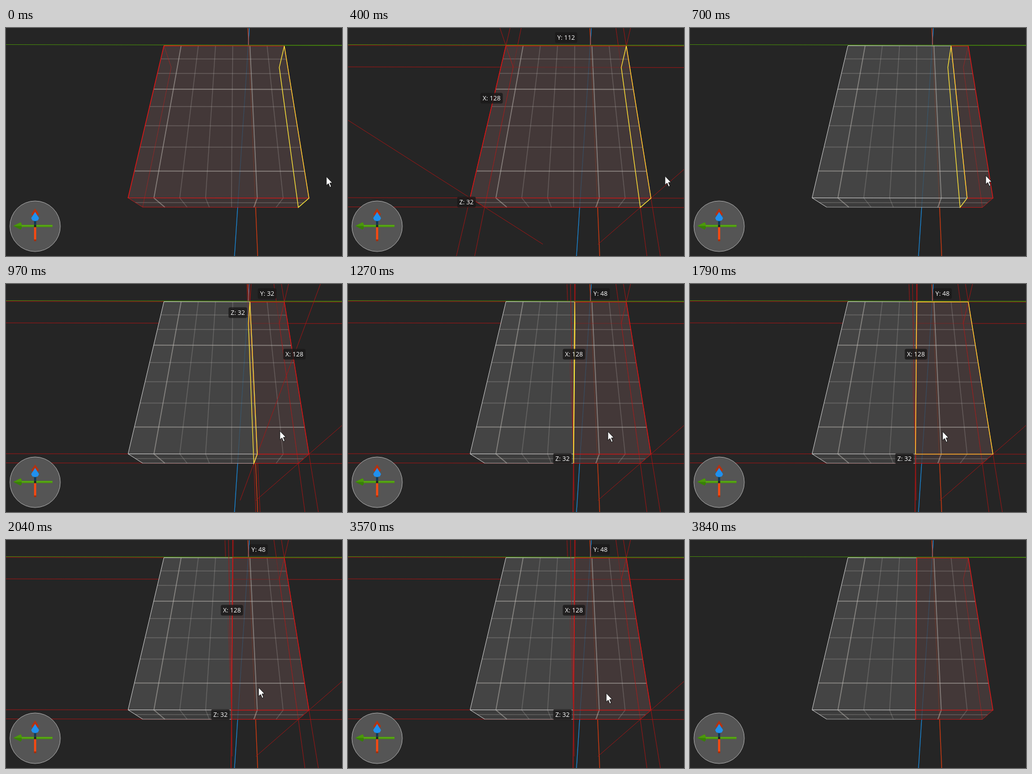
Recreate the animation shown at these times as an HTML page with a canvas. Size 600x406 px, loop 3.99 s.

```html
<!DOCTYPE html>
<html lang="en">
<head>
<meta charset="utf-8">
<style>
  html, body { margin: 0; overflow: hidden; background: #252525; }
  canvas { display: block; }
</style>
</head>
<body>
<canvas width="600" height="406"></canvas>
<script>
const ctx = document.querySelector('canvas').getContext('2d');
const LOOP = 3990, COLS = 7, ROWS = 8;
const RED = '#f01414', GUIDE = 'rgba(170,20,20,.85)', YELLOW = '#f8ee3c', GREEN = '#44800e';

// Corners per face: far left, far right, near left, near right
const TOP = [[282, 31], [497, 31.5], [218, 302], [541, 302.5]];
const BOTTOM = [[295, 69.3], [488, 69.7], [244, 318.5], [522, 319]];

// start, cut column, guide opacity, highlighted face, cursor x, y
const STATES = [
  [0, 0, 0, 'side', 572, 264],
  [400, 0, 1, 'side', 566, 263],
  [550, 0, 1, 'side', 548, 262],
  [700, 6, 0, 'side', 528, 262],
  [820, 6, 1, 'side', 508, 261],
  [970, 5, 1, 'side', 489, 261],
  [1120, 5, 1, 'side', 473, 261],
  [1270, 4, 1, 'side', 464, 262],
  [1390, 4, 1, 'side', 457, 262],
  [1510, 4, 1, 'side', 451, 262],
  [1790, 4, 1, 'top', 451, 262],
  [2040, 4, 1, '', 451, 262],
  [3570, 4, 1, '', 461, 272],
  [3720, 4, .5, '', 505, 318],
  [3840, 4, 0, '', -50, 0]
];

const mix = (a, b, t) => [a[0] + (b[0] - a[0]) * t, a[1] + (b[1] - a[1]) * t];

function point(face, col, depth) {
  const s = depth * 215 / (323 * (1 - depth) + 215 * depth);
  const u = col / COLS;
  return mix(mix(face[0], face[1], u), mix(face[2], face[3], u), s);
}

function path(points, closed) {
  ctx.beginPath();
  points.forEach(p => ctx.lineTo(...p));
  if (closed) ctx.closePath();
}
function line(color, width, ...points) {
  path(points);
  ctx.strokeStyle = color;
  ctx.lineWidth = width;
  ctx.stroke();
}
function fill(color, ...points) {
  path(points, true);
  ctx.fillStyle = color;
  ctx.fill();
}
function faded(alpha, paint) {
  ctx.save();
  ctx.globalAlpha = alpha;
  paint();
  ctx.restore();
}
const ray = (a, b, from, to) => line(GUIDE, 1, mix(a, b, from), mix(a, b, to));
const topFace = (from, to) =>
  [point(TOP, from, 0), point(TOP, to, 0), point(TOP, to, 1), point(TOP, from, 1)];

function axes() {
  line('#1c86d2', 1.2, [434.5, 0], [408, 406]);
  line('#d23c12', 1.2, [432, 0], [449.5, 406]);
}

function guides(cut) {
  for (const face of [TOP, BOTTOM]) {
    for (const depth of [0, 1]) ray(point(face, 0, depth), point(face, COLS, depth), -5, 5);
    for (const col of [cut, COLS]) ray(point(face, col, 0), point(face, col, 1), -1, 2);
  }
  for (const col of [cut, COLS]) ray(point(TOP, col, 0), point(BOTTOM, col, 0), -9, 1);
  if (cut === 4) ray([391, 0], [403, 319], 0, 1);
}

function frontGuides(cut) {
  for (const col of [cut, COLS]) ray(point(TOP, col, 1), point(BOTTOM, col, 1), -25, 5);
}

// Guides behind the translucent piece
function innerGuides(cut) {
  path(topFace(cut ? cut - .2 : 0, COLS), true);
  ctx.clip();
  guides(cut);
}

function block(from, to, topColor, frontColor) {
  fill(topColor, ...topFace(from, to));
  fill(frontColor, point(TOP, from, 1), point(TOP, to, 1), point(BOTTOM, to, 1), point(BOTTOM, from, 1));
}

function grid() {
  const stroke = (major, ...points) =>
    line(`rgba(205,200,195,${major ? .46 : .24})`, major ? 1.7 : 1.4, ...points);
  for (let c = 1; c < COLS; c++)
    stroke(c % 4 === 1, point(TOP, c, 0), point(TOP, c, 1), point(BOTTOM, c, 1));
  for (let r = 1; r < ROWS; r++)
    stroke(r % 4 === 3, point(TOP, 0, r / ROWS), point(TOP, COLS, r / ROWS));
  stroke(false, mix(TOP[2], BOTTOM[2], .5), mix(TOP[3], BOTTOM[3], .5));
}

function restOutline(cut) {
  const color = '#c8c8c8';
  line(color, 1, point(TOP, cut, 0), TOP[0], TOP[2], point(TOP, cut, 1));
  line(color, 1, TOP[2], BOTTOM[2]);
  faded(.7, () => line(color, 1, BOTTOM[2], point(BOTTOM, cut, 1)));
}

function pieceOutline(cut) {
  const face = topFace(cut, COLS);
  line(RED, 1.2, ...face, face[0]);
  faded(.65, () => line(RED, 1, face[3], point(BOTTOM, cut, 1), BOTTOM[3], face[2]));
  faded(.4, () => {
    for (const col of [cut, COLS])
      line(RED, 1, point(TOP, col, 0), point(BOTTOM, col, 0), point(BOTTOM, col, 1));
  });
}

function highlight(face, cut) {
  const col = cut || COLS;
  const points = face === 'side'
    ? [point(TOP, col, 0), point(TOP, col, 1), point(BOTTOM, col, 1), point(BOTTOM, col, 0)]
    : topFace(cut, COLS);
  line(YELLOW, 1.2, ...points, points[0]);
}

function label(text, x, y) {
  ctx.font = '11.3px "Open Sans", sans-serif';
  ctx.textAlign = 'center';
  const w = ctx.measureText(text).width + 8;
  ctx.fillStyle = 'rgba(26,25,25,.82)';
  ctx.beginPath();
  ctx.roundRect(x - w / 2, y - 10, w, 19, 3);
  ctx.fill();
  ctx.fillStyle = '#fff';
  ctx.fillText(text, x, y + 3.5);
}

function labels(cut) {
  const xPos = { 0: 256.5, 4: 403.5 }[cut] || 515;
  const zPos = { 0: [211.5, 310], 4: [383, 311], 5: [414, 51], 6: [444, 51] }[cut];
  label(`Y: ${(COLS - cut) * 16}`, (point(TOP, cut, 0)[0] + 497) / 2, 17);
  label('X: 128', xPos, 125);
  label('Z: 32', ...zPos);
}

function compass() {
  ctx.beginPath();
  ctx.arc(52, 352.5, 45, 0, 7);
  ctx.fillStyle = '#555';
  ctx.fill();
  ctx.strokeStyle = '#aaa';
  ctx.lineWidth = 1;
  ctx.stroke();
  fill('#b43210', [52, 321], [59, 331], [56, 334], [48, 334], [45, 331]);
  line('#123a54', 4, [52, 340], [52, 352]);
  line('#4a960a', 4, [25, 352], [83, 352]);
  line('#5cb014', 1.5, [27, 351.5], [83, 351.5]);
  fill('#388008', [13, 352], [26, 345.5], [28, 348], [28, 356], [26, 358.5]);
  fill('#4c980c', [13, 352], [26, 345.5], [28, 348], [28, 352]);
  line('#f04a14', 4, [52, 354], [52, 377]);
  line('#a82c08', 4, [52, 376], [52, 379]);
  fill('#222', [50, 350], [54, 350], [54, 354], [50, 354]);
  fill('#2090ee', [52, 327], [59, 338], [57, 342], [52, 343.5], [47, 342], [45, 338]);
}

function cursor(x, y) {
  ctx.save();
  ctx.translate(x, y);
  const arrow = [[0, 0], [0, 16], [3.7, 12.6], [6.4, 19], [9, 18], [6.3, 11.6], [11, 11.4]];
  fill('#fff', ...arrow);
  line('#111', 1, ...arrow, arrow[0]);
  ctx.restore();
}

function draw(time) {
  const [, cut, alpha, face, x, y] = STATES.findLast(s => s[0] <= time);
  ctx.setTransform(1, 0, 0, 1, 0, 0);
  ctx.fillStyle = '#252525';
  ctx.fillRect(0, 0, 600, 406);
  ctx.translate(0, .5);

  axes();
  line(GREEN, 1.2, [0, 29], [600, 30.3]);
  faded(alpha, () => guides(cut));

  if (cut) block(0, cut, '#444', '#3c3c3c');
  block(cut, COLS, '#433838', '#3d3333');
  faded(.25, axes);
  grid();
  if (cut) restOutline(cut);
  pieceOutline(cut);
  faded(alpha * .5, () => innerGuides(cut));
  line(GREEN, 1.2, [282, 30], [600, 30.3]);

  faded(alpha, () => frontGuides(cut));
  if (face) highlight(face, cut);
  compass();
  if (alpha) faded(alpha, () => labels(cut));
  cursor(x, y);
}

const start = performance.now();
function tick() {
  draw((performance.now() - start) % LOOP);
  requestAnimationFrame(tick);
}
tick();
</script>
</body>
</html>
```
